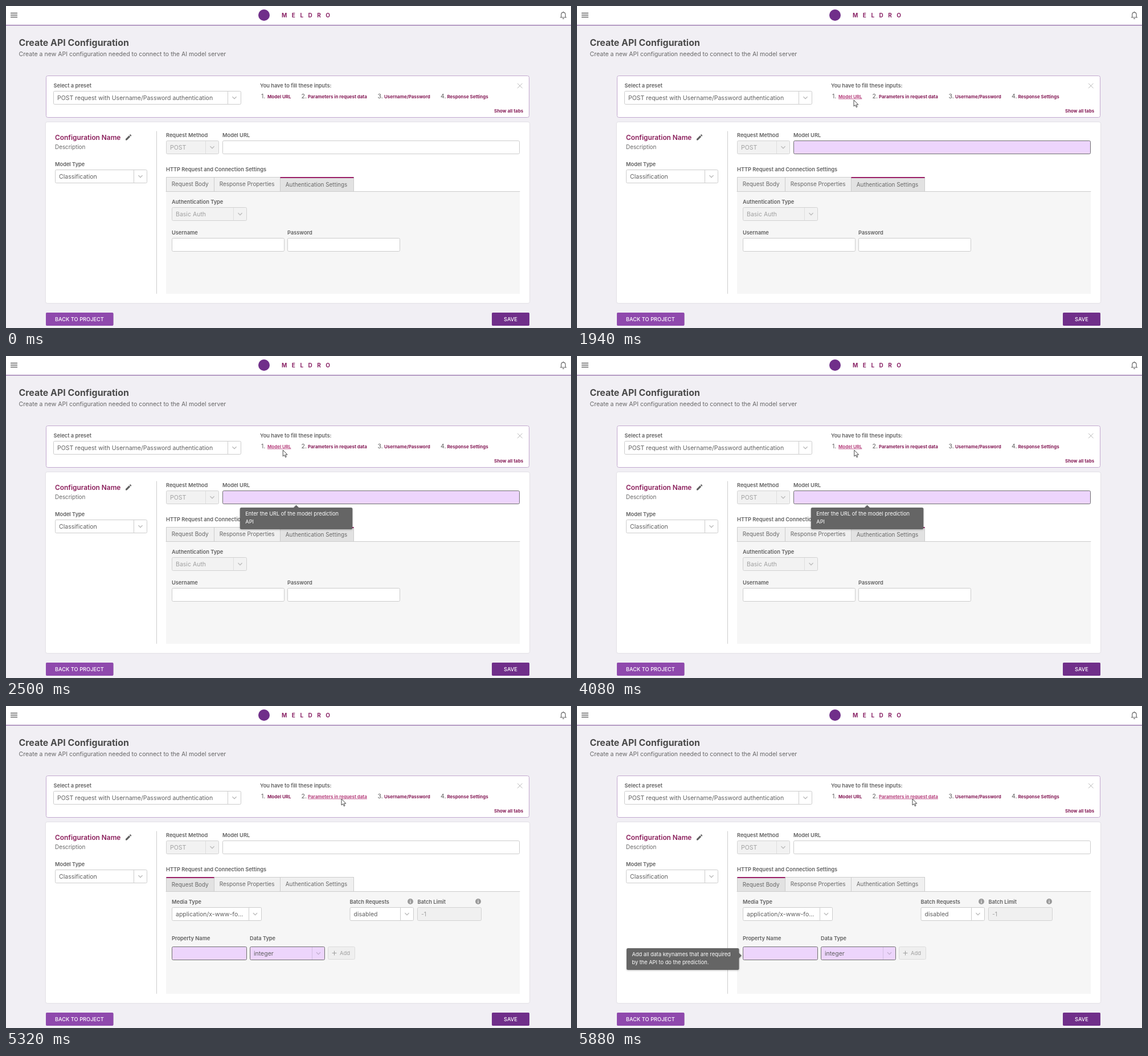
Recreate the animation shown at these times as an HTML page. Size 992 by 565 pixels, loop 8 s.

```html
<!DOCTYPE html>
<html lang="en">
<head>
<meta charset="utf-8">
<title>API configuration</title>
<style>
html, body { margin: 0; width: 100%; height: 100%; overflow: hidden; background: #f1eff4; }
svg { display: block; width: 100vw; height: 100vh; }
text { font-family: Inter, Roboto, sans-serif; fill: #676767; white-space: pre; }
.label { font-size: 9.24px; font-weight: 600; fill: #606060; }
.value { font-size: 10.54px; fill: #606060; }
.dim { font-size: 10.54px; fill: #a0a0a0; }
.tab { font-size: 9.88px; }
.link { font-size: 7.91px; font-weight: 700; fill: #861d58; }
.link.hover { fill: #b8437f; text-decoration: underline; }
.button { font-size: 9.24px; font-weight: 500; fill: #fff; }
.tip { filter: drop-shadow(0 1px 1.5px #0004); }
.line { fill: none; stroke-linecap: round; stroke-linejoin: round; }
</style>
</head>
<body>
<svg id="stage" viewBox="0 0 992 565"></svg>
<script>
const SIZE = { label: 9.24, value: 10.54, dim: 10.54, tab: 9.88, link: 7.91, button: 9.24 };

// y is the middle of the capitals
const text = (x, y, str, cls, extra = '') =>
  `<text x="${x}" y="${y + 0.364 * SIZE[cls]}" class="${cls}" ${extra}>${str}</text>`;
const styled = (x, y, str, size, weight, fill, extra = '') =>
  `<text x="${x}" y="${y + 0.364 * size}" style="font-size:${size}px;font-weight:${weight};fill:${fill};${extra}">${str}</text>`;
const rect = (x, y, w, h, fill, stroke = 'none', r = 0, extra = '') =>
  `<rect x="${x}" y="${y}" width="${w}" height="${h}" rx="${r}" fill="${fill}" stroke="${stroke}" ${extra}/>`;
const line = (d, stroke, width = 1) =>
  `<path class="line" d="${d}" stroke="${stroke}" stroke-width="${width}"/>`;
const field = (x, y, w, fill = '#fff', stroke = '#ccc', extra = '') =>
  rect(x, y, w, 23, fill, stroke, 2, extra);

function select(x, y, w, split, str, state = 'on') {
  const [fill, stroke, sep, cls] = {
    on: ['#fff', '#ccc', '#ccc', 'value'],
    off: ['#f2f2f2', '#d2d2d2', '#dedede', 'dim'],
    lit: ['#edd5fc', '#707070', '#d3bfe0', 'value']
  }[state];
  const mid = (split + x + w) / 2;
  return field(x, y, w, fill, stroke) +
    line(`M${split} ${y + 1}v21`, sep) +
    line(`M${mid - 3.2} ${y + 10}l3.2 3.2 3.2-3.2`, state === 'lit' ? '#c5b2d2' : '#bbb', 1.3) +
    text(x + 6.5, y + 11.8, str, cls);
}

function tabs(active) {
  const edges = [281.5, 365.5, 481.5, 610.5];
  const names = ['Request Body', 'Response Properties', 'Authentication Settings'];
  let out = '';
  names.forEach((name, i) => {
    const x = edges[i], w = edges[i + 1] - x;
    out += rect(x, 300.5, w, 25, i === active ? '#e2e2e2' : '#f0f0f0', '#ccc');
    out += text(x + 9.3, i === active ? 313 : 312.5, name, 'tab');
  });
  const x = edges[active];
  return out + rect(x, 300, edges[active + 1] - x, 2, '#991e66');
}

const info = x => `<circle cx="${x}" cy="343" r="5" fill="#9b9b9b"/>` +
  line(`M${x} 342.6v3`, '#fff', 1.2) + line(`M${x} 340.4v.1`, '#fff', 1.3);

const tip = (id, x, y, arrow, lines) =>
  `<g class="tip" id="${id}">` + rect(x, y, 197.5, 38, '#656565', 'none', 2.5) +
  `<path d="${arrow}" fill="#656565"/>` +
  lines.map((s, i) => text(x + 9.5, y + 11 + 14 * i, s, 'label', 'style="font-weight:400;fill:#fff"')).join('') + '</g>';

const header = rect(0, 0, 992, 34, '#fff') + rect(0, 33, 992, 1.4, '#9a76ad') +
  [12.5, 16, 19.5].map(y => line(`M8.5 ${y}h11`, '#666', 1.4)).join('') +
  '<circle cx="453" cy="16" r="10" fill="#702f8a"/>' +
  styled(484, 16, 'MELDRO', 10, 700, '#8a2366', 'letter-spacing:8.5px') +
  line('M973.3 20h10.4M974.8 19.6v-4.3c0-5.5 7.4-5.5 7.4 0v4.3M978.5 11v-.8M977.6 22.2h1.8', '#666', 1.2) +
  styled(22.5, 64, 'Create API Configuration', 15.9, 700, '#4a4a4a') +
  styled(22.5, 84.5, 'Create a new API configuration needed to connect to the AI model server', 10.54, 400, '#676767');

const links = [[448, 459, 'Model URL'], [518.5, 530, 'Parameters in request data'],
  [652.5, 664, 'Username/Password'], [763, 774.5, 'Response Settings']];

const preset = rect(70.5, 122.5, 848, 73, '#fff', '#c2a8cf', 3) +
  text(83.5, 140, 'Select a preset', 'label') +
  select(83.5, 149.5, 329, 389.5, 'POST request with Username/Password authentication') +
  text(446, 140, 'You have to fill these inputs:', 'label') +
  links.map(([x, linkX, str], i) => text(x, 158.3, i + 1 + '.', 'value') +
    text(linkX, 158.7, str, 'link', `id="link${i}"`)).join('') +
  text(857, 184, 'Show all tabs', 'link') +
  line('M898.3 136l8 8m0-8l-8 8', '#b8b8b8', 1);

const card = rect(70, 204, 849, 317, '#fff', 'none', 3, 'style="filter:drop-shadow(0 .5px 1px #0002)"') +
  styled(86, 230.5, 'Configuration Name', 11.86, 600, '#8a1d5a') +
  '<path d="M210 235.5v-2.3l6-6 2.3 2.3-6 6zM216.7 226.5l1-1q.6-.5 1.1 0l1.2 1.2q.5.5 0 1.1l-1 1z" fill="#606060"/>' +
  styled(86, 247, 'Description', 9.88, 400, '#676767') +
  text(86, 277.5, 'Model Type', 'label') +
  select(86.5, 287.5, 161, 224.5, 'Classification') +
  line('M264.5 220v284.5', '#ccc') +
  text(281, 227, 'Request Method', 'label') +
  select(281.5, 236.5, 92, 350.5, 'POST', 'off') +
  text(380, 227, 'Model URL', 'label') +
  field(380.5, 236.5, 521, '#fff', '#ccc', 'id="url"') +
  text(281, 287, 'HTTP Request and Connection Settings', 'label') +
  rect(281, 325, 621, 180, '#f6f6f6') + line('M281 325.5h621', '#ccc');

const authTab = '<g id="auth">' + tabs(2) +
  text(291, 344, 'Authentication Type', 'label') +
  select(291.5, 353.5, 131, 399.5, 'Basic Auth', 'off') +
  text(291, 397.5, 'Username', 'label') + field(291.5, 407.5, 197) +
  text(494, 397.5, 'Password', 'label') + field(494.5, 407.5, 197) + '</g>';

const bodyTab = '<g id="body">' + tabs(0) +
  text(291, 344, 'Media Type', 'label') +
  select(291.5, 353.5, 157, 426.5, 'application/x-www-fo...') +
  text(603.4, 344, 'Batch Requests', 'label') + info(710) +
  select(604, 353.5, 111.5, 692.5, 'disabled') +
  text(722.4, 344, 'Batch Limit', 'label') + info(829) +
  field(722.5, 353.5, 112, '#f0f0f0', '#d2d2d2') + text(729, 365.5, '-1', 'dim') +
  text(291, 407.5, 'Property Name', 'label') + field(291.5, 422.5, 131, '#edd5fc', '#707070') +
  text(428, 407.5, 'Data Type', 'label') +
  select(428.5, 422.5, 131, 537.5, 'integer', 'lit') +
  rect(565.5, 422.5, 47, 22, '#efefef', '#dcdcdc', 2) +
  line('M573 433.5h7m-3.5-3.5v7', '#a0a0a0', 1.1) +
  styled(586, 433.5, 'Add', 9.4, 400, '#a0a0a0') + '</g>';

const buttons =
  rect(70, 538, 118.5, 23, '#8f49ad', 'none', 2, 'style="filter:drop-shadow(0 .5px .7px #0004)"') +
  text(86, 550, 'BACK TO PROJECT', 'button') +
  rect(853, 538, 66, 23, '#702f8a', 'none', 2, 'id="save" style="filter:drop-shadow(0 .5px .7px #0004)"') +
  text(874, 550, 'SAVE', 'button');

const $ = id => document.getElementById(id);
$('stage').innerHTML = rect(0, 0, 992, 565, '#f1eff4') + header + preset + card + authTab + bodyTab + buttons +
  tip('urlTip', 410.8, 266, 'M504.5 266.5l5-5 5 5z', ['Enter the URL of the model prediction', 'API']) +
  tip('keyTip', 87, 425, 'M284 433l5 5-5 5z', ['Add all data keynames that are required', 'by the API to do the prediction.']) +
  '<path id="cursor" d="M0 0V11L2.5 8.7 4.3 12.7 6 12 4.3 8.1H7.8Z" fill="#fff" stroke="#333" stroke-width=".9"/>';

const LOOP = 8000;
// time, x, y of the pointer tip
const path = [[560, 886, 540], [1330, 508, 207], [1400, 506, 204], [1900, 486, 165], [4080, 486.5, 165],
  [4500, 548, 179], [4760, 548, 179], [4900, 552, 176], [5270, 589, 163], [LOOP, 589, 163]];
const clamp = v => Math.min(1, Math.max(0, v));
const easeOut = v => 1 - (1 - clamp(v)) ** 2;
const show = (id, on) => $(id).style.display = on ? '' : 'none';

function pointer(t) {
  const i = Math.max(1, path.findIndex(p => p[0] > t));
  const [t0, x0, y0] = path[i - 1], [t1, x1, y1] = path[i];
  const k = easeOut((t - t0) / (t1 - t0));
  return [x0 + (x1 - x0) * k, y0 + (y1 - y0) * k];
}

function draw(t) {
  const onUrl = t >= 1890 && t < 4150, onParams = t >= 5250;
  const [x, y] = pointer(t);
  show('cursor', t >= 560);
  $('cursor').setAttribute('transform', `translate(${x} ${y})`);
  $('save').setAttribute('fill', t >= 560 && t < 630 ? '#8f49ad' : '#702f8a');
  $('link0').classList.toggle('hover', onUrl);
  $('link1').classList.toggle('hover', onParams);
  $('url').setAttribute('fill', onUrl ? '#edd5fc' : '#fff');
  $('url').setAttribute('stroke', onUrl ? '#707070' : '#ccc');
  show('auth', !onParams);
  show('body', onParams);
  $('urlTip').style.opacity = easeOut((t - 1960) / 540) * (1 - easeOut((t - 4150) / 350));
  $('keyTip').style.opacity = easeOut((t - 5330) / 540);
}

const start = performance.now();
function tick() {
  draw((performance.now() - start) % LOOP);
  requestAnimationFrame(tick);
}
tick();
</script>
</body>
</html>
```
